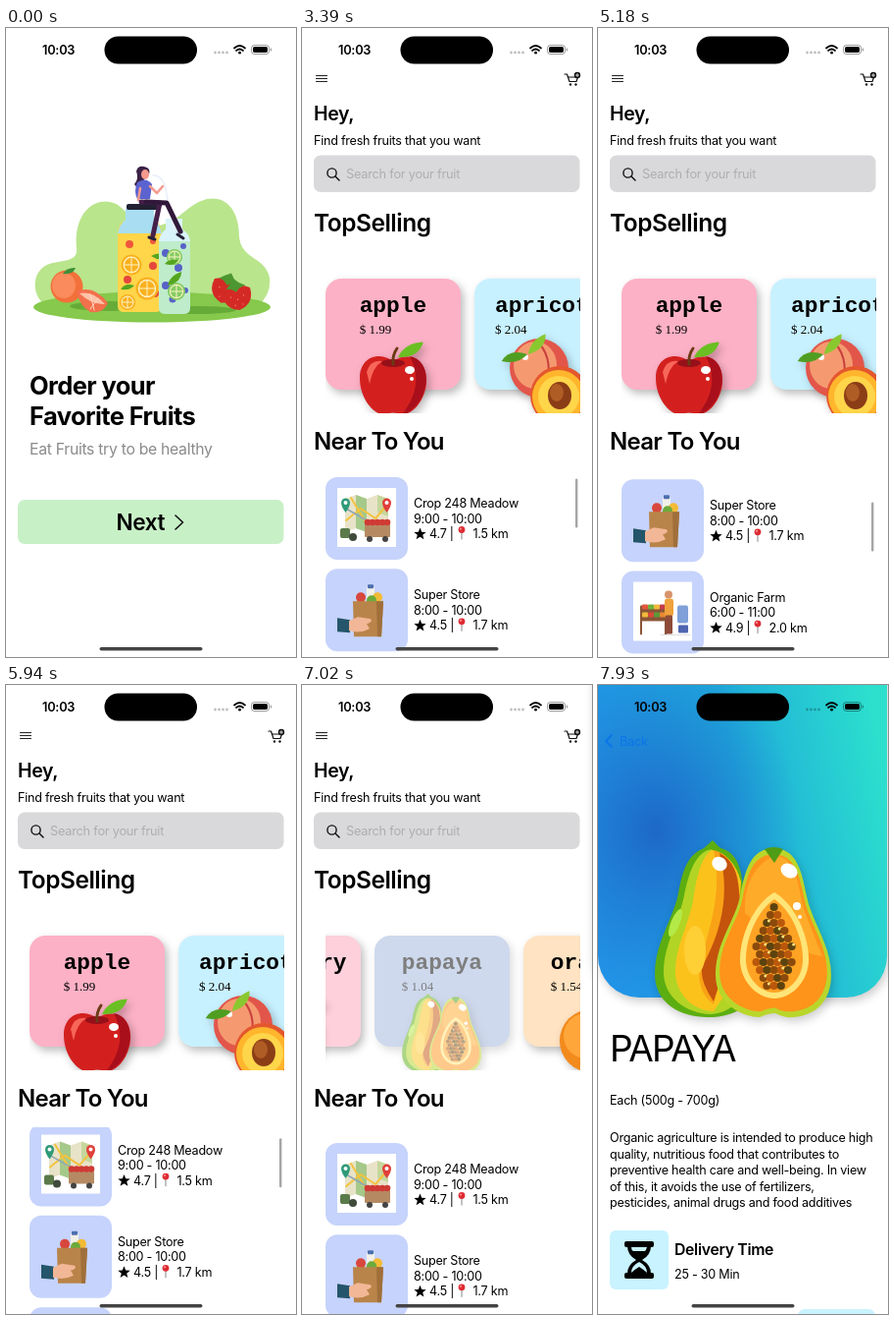
Animation, 296 px wide and 640 px high, one loop 8000 ms. Source, as an HTML page:

```html
<!DOCTYPE html>
<html lang="en">
<head>
<meta charset="utf-8">
<title>Fruit shop</title>
<style>
html, body { margin: 0; width: 100%; height: 100%; overflow: hidden; background: #fff; }
#stage { display: block; }
text { font-family: Inter, sans-serif; letter-spacing: -.02em; white-space: pre; }
.mono { font: bold 22.8px "Liberation Mono", monospace; letter-spacing: 0; }
.serif { font-family: "Liberation Serif", serif; letter-spacing: 0; }
.card { filter: drop-shadow(3px 4px 4px #0004); }
.hero { filter: drop-shadow(2px 4px 5px #0003); }
</style>
</head>
<body>
<svg id="stage" width="296" height="640" viewBox="0 0 296 640"></svg>
<script>
const rect = (x, y, w, h, r, fill, more = '') =>
  `<rect x="${x}" y="${y}" width="${w}" height="${h}" rx="${r}" fill="${fill}" ${more}/>`;
const oval = (x, y, rx, ry, fill, more = '') =>
  `<ellipse cx="${x}" cy="${y}" rx="${rx}" ry="${ry}" fill="${fill}" ${more}/>`;
const dot = (x, y, r, fill, more) => oval(x, y, r, r, fill, more);
const path = (d, fill, more = '') => `<path d="${d}" fill="${fill}" ${more}/>`;
const line = (d, color, width = 1.5) =>
  path(d, 'none', `stroke="${color}" stroke-width="${width}" stroke-linecap="round" stroke-linejoin="round"`);
const text = (x, y, size, str, more = '') =>
  `<text x="${x}" y="${y}" font-size="${size}" ${more}>${str}</text>`;
const group = (id, body, more = '') => `<g id="${id}" ${more}>${body}</g>`;
const move = (x, y, body, scale = 1) => `<g transform="translate(${x} ${y}) scale(${scale})">${body}</g>`;
const clip = (x, y, w, h, body) =>
  `<svg x="${x}" y="${y}" width="${w}" height="${h}" viewBox="${x} ${y} ${w} ${h}">${body}</svg>`;
const bold = 'font-weight="700"', semi = 'font-weight="600"';

// ---- fruit ----
const leaf = (x, y, angle, size = 1, fill = '#55a51f') =>
  path('M0 0Q8 -13 26 -12Q20 3 0 0Z', fill, `transform="translate(${x} ${y}) rotate(${angle}) scale(${size})"`);

const apple = () =>
  path('M69 339C53 328 35 336 35 356C35 378 50 394 60 393Q69 390 78 393C90 394 104 376 103 356C102 336 84 329 69 339Z', '#d3201f') +
  path('M86 334C104 337 107 360 97 378Q88 392 78 393C93 375 97 354 86 334Z', '#a80f1b') +
  path('M42 350Q46 337 58 339Q48 345 45 362Z', '#f7665a') +
  oval(69, 341, 12, 4, '#96101a') + oval(86, 348, 5, 4, '#fff') + dot(88, 357, 2, '#fff') +
  line('M69 342Q68 333 73 326', '#6b3b16', 3) + leaf(74, 335, -6, 1.05, '#6abf22');

const apricot = () =>
  dot(66, 346, 30, '#e2564a') + oval(62, 343, 22, 24, '#f59a70') + line('M66 321Q82 338 72 372', '#c93f3c', 2) +
  dot(52, 335, 3, '#fff') + leaf(54, 332, -170, .95, '#4f9e22') + leaf(55, 332, -25, .95, '#8ac830') +
  dot(87, 374, 30, '#e4572e') + dot(86, 375, 27, '#ffb52c') + dot(86, 375, 21, '#ffd54a') +
  oval(87, 374, 12, 14, '#8b3d16') + oval(84, 371, 7, 9, '#b05c25');

const cluster = (counts, top, step, colors) => counts.map((n, row) =>
  Array.from({ length: n }, (_, i) => {
    const x = 69 + (i - (n - 1) / 2) * step, y = top + row * 11;
    return dot(x, y, 7.4, colors[(i + row) % 2]) + dot(x - 2, y - 2, 3, '#fff', 'opacity=".35"');
  }).join('')).join('');

const crown = () => leaf(69, 332, 8, 1.2, '#3f8f28') + leaf(69, 332, 208, 1.2, '#3f8f28') +
  leaf(69, 334, -40, .8, '#6bb535') + leaf(69, 334, 240, .8, '#6bb535') + line('M69 334L68 318', '#7a4a20', 3);
const grapes = () => crown() + cluster([4, 5, 5, 4, 3, 2], 338, 13, ['#6a5fc4', '#4c3f9f']);
const raspberry = () => cluster([3, 4, 4, 4, 3, 2], 338, 13, ['#e5344f', '#c31f3d']) + crown();
const orange = () => dot(69, 362, 32, '#f28a1c') + dot(64, 357, 23, '#ffa63a') + leaf(70, 333, 0);

function papaya() {
  let seeds = '';
  for (let row = 0; row < 11; row++)
    for (let col = 0; col < 7; col++) {
      const x = 158 + col * 7.2 + row % 2 * 3.6, y = 226 + row * 8;
      if (((x - 180) / (13 + row * 1.2)) ** 2 + ((y - 267) / 46) ** 2 < 1)
        seeds += dot(x, y, 4.1, ['#5b4310', '#8a4a0c', '#b9570c'][(row * 2 + col) % 3]) +
          ((row * 3 + col) % 4 ? '' : dot(x + 2, y - 2, 1.5, '#ffe27a'));
    }
  const half = 'M179 166C155 167 150 190 145 215C140 240 120 262 120 295C120 325 148 338 165 338Q174 334 181 334Q190 339 200 338C222 336 238 322 238 295C238 265 218 240 213 215C208 190 203 166 179 166Z';
  return path('M116 165C92 166 86 190 82 212C77 238 58 262 58 294C58 324 84 338 112 338C145 338 170 320 165 285C162 250 150 225 148 205C146 180 138 165 116 165Z', '#5cae10') +
    path('M116 167C98 170 92 195 88 214C83 240 66 266 67 294C68 318 90 334 115 335C140 334 158 310 158 285C150 240 148 190 116 167Z', '#b2d424') +
    path('M116 168C104 176 100 200 97 220C92 245 78 268 79 295C82 318 98 331 118 332L140 300L146 200Q138 172 116 168Z', '#fcc21c') +
    path('M118 168C134 172 141 185 143 207Q147 240 128 285L118 325Q100 312 104 285C112 250 128 215 118 168Z', '#f9a216') +
    path('M124 171C138 178 143 192 144 210Q148 235 140 255L118 322Q104 302 106 287C124 255 136 215 124 171Z', '#c4530c') +
    oval(99, 270, 11, 25, '#ffcf36') + oval(79, 242, 4.5, 15, '#b4ea48', 'transform="rotate(22 79 242)"') +
    path('M107 167L117 158L127 168Z', '#5cae10') + oval(124, 182, 8, 7, '#fff', 'transform="rotate(35 124 182)"') +
    path(half, '#b9d62b') +
    move(12.5, 17.8, path(half, '#ff941a'), .93) +
    path('M179 174C204 174 204 205 209 225Q218 250 229 276Q190 270 150 232Q148 190 179 174Z', '#ffab2a') +
    path('M180 211C160 222 144 255 145 282C147 305 165 319 180 319C195 319 213 305 215 282C216 255 200 222 180 211Z', '#ffe578') +
    path('M180 218C164 228 150 257 151 281C152 301 168 313 180 313C192 313 208 301 209 281C210 257 196 228 180 218Z', '#ffa324') + seeds +
    path('M170 167Q179 163 189 167L180 181Z', '#4f9c16') +
    oval(195, 189, 9, 7, '#fff', 'transform="rotate(30 195 189)"') + dot(203, 225, 4, '#fff') + dot(206, 236, 2, '#fff');
}

// ---- welcome screen ----
const jar = (x, y, w, h, fill, bits) =>
  path(`M${x + 8} ${y}h${w - 16}v11q8 4 8 16v${h - 33}q0 6 -7 6h${14 - w}q-7 0 -7 -6v${33 - h}q0 -12 8 -16z`, fill) +
  bits.map(([dx, dy, r, color]) => dot(x + dx, y + dy, r, color)).join('');
const slice = (x, y, r, color) => dot(x, y, r, color) + dot(x, y, r * .8, '#fff3c4') + dot(x, y, r * .68, color) +
  line(`M${x - r * .7} ${y}h${r * 1.4}M${x} ${y - r * .7}v${r * 1.4}`, '#fff3c4', 1);
const berry = (x, y, tilt) => `<g transform="translate(${x} ${y}) rotate(${tilt}) scale(1.1)">` +
  path('M-13 -6Q0 -14 13 -6Q15 9 0 13Q-15 9 -13 -6Z', '#d42a26') +
  path('M-9 -8L-5 -12L0 -16L4 -12L9 -9L3 -7L0 -4L-4 -7Z', '#4d9730') +
  [[-6, 0], [0, 3], [6, 0], [-3, 8], [4, 8]].map(([a, b]) => dot(a, b, .6, '#f58a78')).join('') + '</g>';

const picture =
  path('M42 283C28 276 24 252 40 242C54 235 74 240 72 224C70 205 76 182 96 177C112 174 120 184 126 192Q140 208 160 200C180 194 184 180 205 174C228 170 238 190 238 212C240 236 264 232 269 254Q271 270 258 282Z', '#b9e58c') +
  oval(149, 284, 121, 15.5, '#86c94c') + oval(105, 283, 40, 5, '#66ab38') + oval(195, 287, 40, 4, '#66ab38') +
  jar(114, 184, 45, 105, '#ffd54a', [[12, 36, 4, '#f0563c'], [36, 58, 4, '#e5473c'], [10, 72, 4, '#e5473c'], [38, 86, 4, '#e5473c'], [36, 33, 3, '#f0563c']]) +
  path('M122 184h29v11q6 4 8 14h-45q2 -10 8 -14z', '#a9def2') + rect(123, 179, 32, 6, 2, '#222132') +
  slice(128, 241, 10.5, '#f9b11f') + slice(144, 265, 11.5, '#f9b11f') + slice(124, 279, 8, '#f9b11f') +
  leaf(148, 232, 25, .6) + leaf(131, 262, 190, .5) +
  jar(156, 194, 32, 97, '#bfeccb', [[7, 35, 4, '#5862c8'], [25, 28, 3, '#5862c8'], [20, 50, 4, '#5862c8'], [7, 68, 4, '#5862c8'], [14, 82, 3.5, '#5862c8'], [27, 73, 3, '#5862c8']]) +
  slice(172, 233, 8, '#84cc62') + slice(174, 268, 9, '#84cc62') + leaf(165, 262, -20, .7) + leaf(162, 240, 10, .5) +
  path('M163 194h17v11q7 4 8 12h-32q1 -8 7 -12z', '#d9f3fa') +
  line('M150 150Q162 150 164 170L172 206', '#e8eef8', 1.5) +
  path('M133 146Q134 140 141 141Q148 142 146 149Q140 152 140 159Q134 164 131 159Q136 153 133 146Z', '#3b2246') +
  oval(142, 149, 4, 5, '#f59a8e') + path('M134 157Q143 151 149 159L147 174H134Q130 166 134 157Z', '#5a63cf') +
  line('M147 161L154 168L160 161', '#f59a8e', 2.5) + line('M137 163L135 175', '#f59a8e', 2.5) +
  line('M138 177L157 178L150 211', '#45204a', 5) + line('M143 177L164 178L178 207', '#31183a', 5) +
  line('M146 213L152 215M175 210L181 214', '#262138', 3) +
  dot(62, 263, 16.5, '#f3703a') + oval(59, 262, 12, 13, '#f98b5c') + leaf(58, 250, 0, .5, '#3f8f38') +
  path('M72 268Q90 261 104 280Q99 291 86 289Q75 283 72 268Z', '#f2704c') +
  path('M75 270Q89 267 101 281Q88 282 75 270Z', '#ffc2a8') + line('M86 271L90 287M94 275L86 286', '#ffd7c4', 1) +
  berry(224, 266, 20) + berry(236, 273, -10);

const welcome = picture +
  text(24, 373, 25.5, 'Order your', bold + ' style="letter-spacing:-.6px"') +
  text(24, 404, 25.5, 'Favorite Fruits', bold + ' style="letter-spacing:-.6px"') +
  text(24, 433.5, 15.8, 'Eat Fruits try to be healthy', 'fill="#8b8b8e"') +
  group('next', rect(12, 480, 271.5, 45, 7, '#c8f0c7') + text(112.5, 510.5, 22.7, 'Next', semi) +
    line('M173 496L180.5 503L173 510', '#111', 1.6));

// ---- shop screen ----
const cards = [
  ['apple', '1.99', '#fdb1c6', apple], ['apricot', '2.04', '#c8f1ff', apricot],
  ['grapes', '2.54', '#fcfce2', grapes], ['raspbery', '3.04', '#fdd0dc', raspberry],
  ['papaya', '1.04', '#9fb4dc', () => move(2, 243, papaya(), .45)], ['orange', '1.54', '#ffe3c2', orange]
].map(([name, price, color, fruit], i) => {
  const x = 69 - name.length * 6.86;
  return move(24 + i * 152, 0, group(name,
    `<g class="card">${rect(0, 255, 138, 113, 16, color)}</g>` +
    `<text x="${x}" y="289" class="mono">${name}</text>` +
    text(x, 310.5, 13, '$ ' + price, 'class="serif"') + `<g class="card">${fruit()}</g>`));
}).join('');

const map = rect(12, 11, 60, 60, 0, '#fff') + path('M20 22L31 18L42 22L53 18L64 22V56L53 52L42 56L31 52L20 56Z', '#e8e3c8') +
  path('M31 18L42 22V56L31 52Z', '#a5c98a') + path('M53 18L64 22V40L53 36Z', '#c5d79c') +
  line('M21 44L36 32L51 42L63 28M26 21L46 54', '#f3c33e', 2) + line('M21 32L42 44L63 46', '#8fa6b8', 1.5) +
  path('M16 26a4 4 0 0 1 9 0q0 4 -4.5 10q-4.5 -6 -4.5 -10z', '#2f9a78') +
  path('M58 26a4 4 0 0 1 9 0q0 4 -4.5 10q-4.5 -6 -4.5 -10z', '#e0403a') + dot(20.5, 26, 2, '#fff') + dot(62.5, 26, 2, '#fff') +
  rect(40, 48, 26, 13, 1, '#b58a63') + [43, 48, 53, 58, 63].map(x => dot(x, 46, 3.3, '#cf3b35')).join('') +
  dot(45, 63, 3, '#444') + dot(61, 63, 3, '#444') + rect(15, 52, 10, 10, 2, '#5a7a4a') + dot(28, 61, 4, '#414b3c');
const bag = rect(32, 25, 8, 14, 3, '#f09b2e') + rect(42, 18, 8, 20, 2, '#f2f0e8') + rect(43, 16, 6, 4, 1, '#4c6fae') +
  dot(36, 29, 5, '#d8473d') + dot(53, 29, 5, '#f3bb36') + dot(47, 32, 5, '#6daa3c') +
  path('M28 33H59L57 69H29Z', '#b98449') + path('M52 33H59L57 69H53Z', '#a06f3a') +
  path('M12 50L25 52V65L12 64Z', '#24556a') + path('M24 53L33 49L46 51Q49 54 42 56L45 61Q36 66 24 63Z', '#f2b796');
const farm = rect(12, 11, 60, 60, 0, '#fff') + rect(19, 35, 28, 16, 1, '#8a5436') +
  [21, 27, 33, 39].map((x, i) => rect(x, 34, 6, 5, 1, ['#e2563c', '#6fb03e', '#f0b93a', '#c53b4b'][i]) +
    rect(x, 42, 6, 5, 1, ['#f0b93a', '#d8473d', '#5a9a3a', '#e88a32'][i])).join('') +
  line('M20 51V64M45 51V64', '#8a5436', 2) + dot(48, 24, 4, '#d8946c') + rect(44, 28, 9, 18, 3, '#f0a23c') +
  rect(45, 45, 7, 19, 1, '#8f4b39') + rect(57, 35, 11, 18, 2, '#7fa0d8') + rect(58, 55, 10, 8, 1, '#4f66b0') + line('M40 65H70', '#ddd', 1);

const rows = [['Crop 248 Meadow', '9:00 - 10:00', '4.7', '1.5', map], ['Super Store', '8:00 - 10:00', '4.5', '1.7', bag],
  ['Organic Farm', '6:00 - 11:00', '4.9', '2.0', farm]]
  .map(([name, hours, stars, km, image], i) => move(24, 466 + i * 93.3,
    rect(0, 0, 84, 84, 12, '#c6d3fc') + image +
    text(90, 31, 12.6, name) + text(90, 46.5, 12.6, hours) +
    path('M96.5 51.5l1.7 4.2 4.5.3-3.5 2.8 1.2 4.4-3.9-2.5-3.9 2.5 1.2-4.4-3.5-2.8 4.5-.3z', '#000') +
    text(106, 62, 12.6, stars + ' |') + line('M139 55V63', '#999', 1.2) + dot(139, 53.5, 3.4, '#de2c34') + dot(138, 52.5, 1, '#ff9a98') +
    text(150.5, 62, 12.6, km + ' km'))).join('');

const shop = rect(0, 0, 296, 640, 0, '#fff') +
  group('bar', line('M14.5 48.5H25.5M14.5 51.5H25.5M14.5 54.5H25.5', '#222', 1.1) +
    line('M268 47H270.5L273 54.5H280L281.5 50H272', '#111', 1.2) + dot(274, 57.5, 1.2, '#111') + dot(279.5, 57.5, 1.2, '#111') +
    dot(281, 48, 3.2, '#111') + line('M279.5 48H282.5M281 46.5V49.5', '#fff', .8)) +
  text(12, 94, 19.5, 'Hey,', semi) + text(12, 119.3, 12.6, 'Find fresh fruits that you want') +
  rect(12, 129.5, 271.5, 37.5, 7, '#d9d9db') +
  dot(30.5, 147.5, 4.6, 'none', 'stroke="#111" stroke-width="1.4"') + line('M34 151L38 155', '#111') +
  text(45, 153.3, 12.8, 'Search for your fruit', 'fill="#aeaeb2"') +
  text(12, 206.5, 24.5, 'TopSelling', semi) +
  clip(24, 240, 260, 152, group('cards', cards)) +
  text(12, 428.5, 24, 'Near To You', semi + ' style="letter-spacing:-.03em"') +
  clip(24, 450, 260, 190, group('rows', rows)) +
  rect(279, 456, 2.4, 50, 1.2, '#a5a5a8', 'id="thumb"');

// ---- detail screen ----
const details = ['Organic agriculture is intended to produce high', 'quality, nutritious food that contributes to',
  'preventive health care and well-being. In view', 'of this, it avoids the use of fertilizers,', 'pesticides, animal drugs and food additives']
  .map((str, i) => text(12, 465 + i * 16.5, 12.6, str)).join('');
const hero = fill => rect(0, -60, 295, 378, 42, `url(#${fill})`);
const detail = rect(0, 0, 296, 640, 0, '#fff') +
  `<g class="hero">${hero('sea')}</g>` + hero('deep') +
  `<g class="hero">${papaya()}</g>` +
  text(12, 383, 37, 'PAPAYA', 'style="letter-spacing:-1.7px"') + text(12, 427, 12.6, 'Each (500g - 700g)') + details +
  rect(12, 555, 60, 60, 6, '#c9f3ff') +
  rect(27, 566, 30, 6, 2, '#000') + rect(27, 598, 30, 6, 2, '#000') +
  path('M30 571H54Q54 580 45 585Q54 590 54 599H30Q30 590 39 585Q30 580 30 571Z', '#000') +
  path('M34 572H50Q49 575 48 576H36Q34 575 34 572ZM42 587Q50 591 50 598Q47 595 42 592Q37 595 34 598Q34 591 42 587Z', '#c9f3ff') +
  text(78, 579.5, 15.8, 'Delivery Time', semi) + text(78, 603.5, 12.6, '25 - 30 Min') +
  rect(204, 635, 79, 40, 7, '#c9f3ff');

const back = line('M14 51L8 57L14 63', '#0b76ea', 1.8) + text(22, 61.5, 12.8, 'Back', 'fill="#0b76ea"');
const status = text(37, 27, 12.8, '10:03', semi) + rect(100.5, 8.5, 94.5, 28, 14, '#000') +
  [213.5, 217.5, 221.5, 225.5].map(x => dot(x, 25, 1.4, '#000', 'opacity=".25"')).join('') +
  line('M233 20.5Q238.5 15.5 244 20.5M235 23Q238.5 20 242 23', '#000', 1.7) + dot(238.5, 25.2, 1.4, '#000') +
  rect(250.5, 17.5, 18, 9, 3, 'none', 'stroke="#000" stroke-opacity=".4"') + rect(252, 19, 15, 6, 1.7, '#000') +
  rect(269.8, 20.5, 1.2, 3, .6, '#000', 'opacity=".4"') + rect(95.5, 630, 105, 3.6, 1.8, '#444');

const stage = document.getElementById('stage');
stage.innerHTML = `<defs>
  <linearGradient id="sea" x1="0" y1=".65" x2="1" y2=".4">
    <stop stop-color="#2298ea"/><stop offset=".5" stop-color="#1eaadb"/><stop offset="1" stop-color="#2ce0cd"/>
  </linearGradient>
  <radialGradient id="deep" cx=".2" cy=".55" r=".5">
    <stop stop-color="#1d68c8"/><stop offset="1" stop-color="#1e72cc" stop-opacity="0"/>
  </radialGradient></defs>` +
  group('welcome', welcome) +
  group('shop', shop) + rect(0, 0, 296, 640, 0, '#000', 'id="dim"') +
  group('detail', detail) + group('back', back) + status;

// ---- motion ----
const node = id => document.getElementById(id);
const clamp = v => Math.max(0, Math.min(1, v));
const shift = (id, x, y = 0) => node(id).setAttribute('transform', `translate(${x} ${y})`);
const fade = (id, v) => node(id).setAttribute('opacity', v);
function track(t, keys) {
  const i = keys.findIndex(k => k[0] > t);
  if (i < 0) return keys.at(-1)[1];
  if (i === 0) return keys[0][1];
  const [[t0, a], [t1, b]] = [keys[i - 1], keys[i]];
  return a + (b - a) * (t - t0) / (t1 - t0);
}
const listKeys = [[3390, 0], [3390, 9], [3810, 9], [3810, 0], [4590, 0], [4590, 5], [4740, 12], [5180, 100], [5520, 104], [5630, 96], [6020, 0]];
const cardKeys = [[6050, 0], [6280, 115], [6390, 266], [6500, 450], [6620, 558]];

function draw() {
  const t = performance.now() % 8000;
  const scroll = track(t, listKeys);
  const u = clamp((t - 7020) / 900), push = u * u * (3 - 2 * u);

  fade('next', t >= 1220 ? .5 : 1);
  fade('shop', clamp((t - 1600) / 270));
  shift('cards', -track(t, cardKeys));
  shift('rows', 0, -scroll);
  shift('thumb', 0, scroll * .265);
  fade('thumb', t >= 3390 && t < 3810 || t >= 4590 ? clamp((6620 - t) / 200) : 0);
  fade('papaya', t >= 6840 ? .5 : 1);

  shift('shop', -88.5 * push);
  fade('dim', .12 * push);
  shift('detail', 296 * (1 - push));
  fade('detail', push ? 1 : 0);
  fade('bar', clamp(1 - push * 2));
  fade('back', clamp(push * 2));
  requestAnimationFrame(draw);
}
draw();
</script>
</body>
</html>
```
